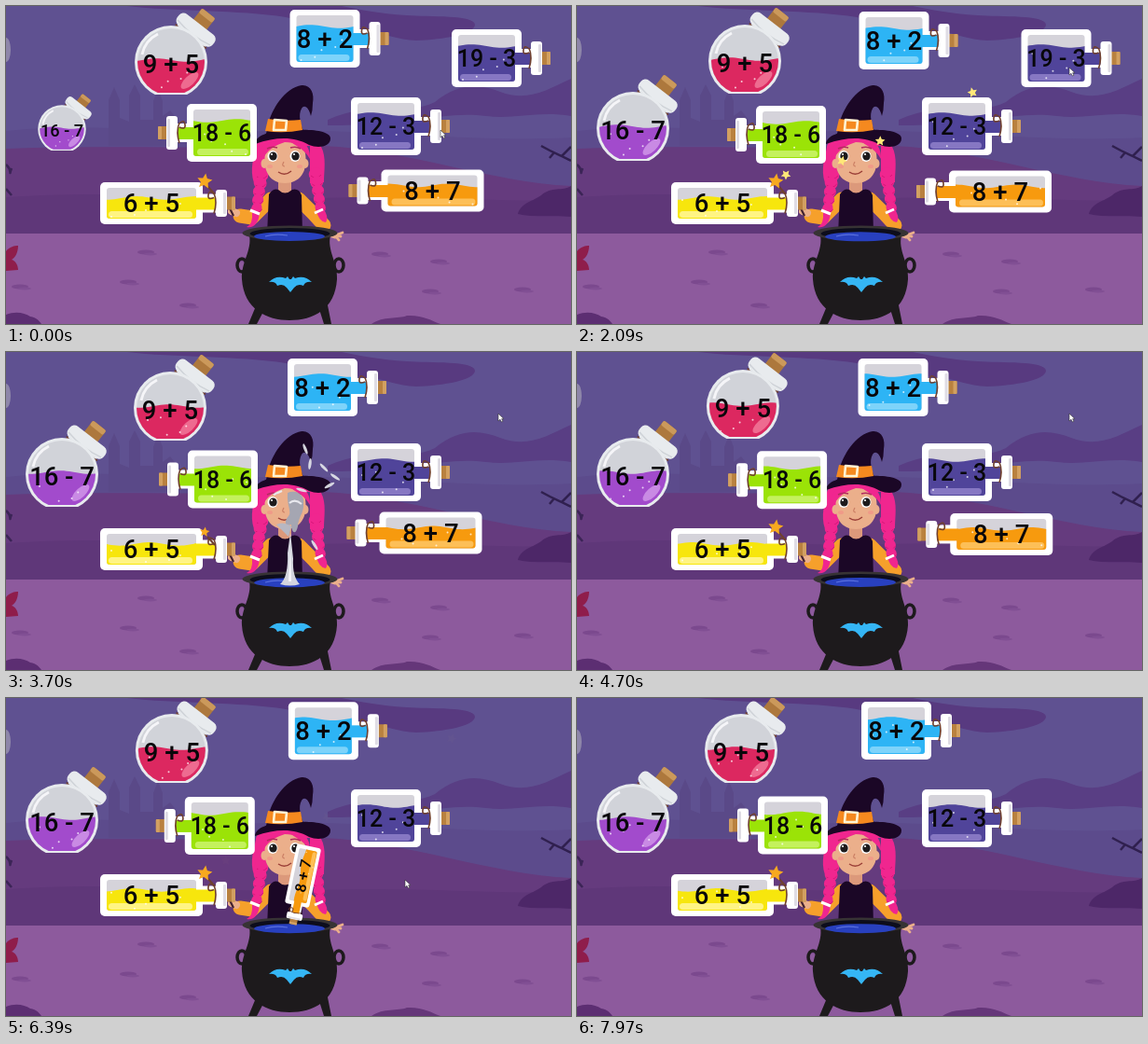
Write an HTML page with a canvas that moves like this. It is 606 px wide and 341 px high and loops after 8030 ms.

```html
<!DOCTYPE html>
<html lang="en">
<head>
<meta charset="utf-8">
<title>Potion sums</title>
<style>
html, body { margin: 0; width: 100%; height: 100%; overflow: hidden; background: #5f5191; }
canvas { display: block; width: 606px; height: 341px; }
</style>
</head>
<body>
<canvas id="stage"></canvas>
<script>
const LOOP = 8030, TAU = Math.PI * 2;
const canvas = document.getElementById('stage');
const c = canvas.getContext('2d');
const dpr = window.devicePixelRatio || 1;
canvas.width = 606 * dpr;
canvas.height = 341 * dpr;

const INK = '#1d1a1c', SKIN = '#ebaf8b', PINK = '#f0268f', HAT = '#1b0726', ORANGE = '#f6a02b';

// Drawing helpers
function path(d, fill, stroke, width = 1) {
  const p = new Path2D(d);
  if (fill) { c.fillStyle = fill; c.fill(p); }
  if (stroke) { c.strokeStyle = stroke; c.lineWidth = width; c.stroke(p); }
}
function oval(x, y, rx, ry, fill, turn = 0) {
  c.beginPath();
  c.ellipse(x, y, rx, ry, turn, 0, TAU);
  c.fillStyle = fill;
  c.fill();
}
function box(x, y, w, h, r, fill) {
  c.beginPath();
  c.roundRect(x, y, w, h, r);
  c.fillStyle = fill;
  c.fill();
}
function star(x, y, r, fill, turn = 0) {
  c.beginPath();
  for (let i = 0; i < 10; i++) {
    const a = turn + i * TAU / 10 - TAU / 4, d = i % 2 ? r * .48 : r;
    c.lineTo(x + d * Math.cos(a), y + d * Math.sin(a));
  }
  c.fillStyle = fill;
  c.fill();
}
function group(draw, x = 0, y = 0, scale = 1, turn = 0) {
  c.save();
  c.translate(x, y);
  c.rotate(turn);
  c.scale(scale, scale);
  draw();
  c.restore();
}

// Timing helpers
const mix = (a, b, k) => a + (b - a) * k;
function ramp(t, from, to) {
  const k = Math.min(1, Math.max(0, (t - from) / (to - from)));
  return k * k * (3 - 2 * k);
}
const pulse = (t, a, b, d, e) => ramp(t, a, b) * (1 - ramp(t, d, e));
const KEYS = [0, 850, 2090, 3700, 5760, 6970, 7970];
function drift(values, t) {
  let i = 0;
  while (i < values.length - 2 && t > KEYS[i + 1]) i++;
  return mix(values[i], values[i + 1], ramp(t, KEYS[i], KEYS[i + 1]));
}

function backdrop() {
  c.fillStyle = '#5f5191';
  c.fillRect(0, 0, 606, 341);
  path('M130 0C180 6 250 4 300 12C330 18 350 26 385 27C405 28 420 37 440 37C470 36 503 30 503 20C502 9 455 12 430 10C400 8 380 4 360 0Z', '#583a80');
  path('M345 122C395 100 430 118 460 103C485 82 508 83 530 92C560 103 580 90 606 78V118C570 112 545 122 515 118C470 112 440 128 345 128Z', '#593e84');
  path('M0 134C90 124 180 137 290 134C400 132 500 147 606 141V200H0Z', '#5c4b8c');
  path('M110 150V101L116 87L122 101V120L132 124V96L138 84L144 96V122H158V102L163 89L168 102V118L176 112L184 122V150Z', '#5a4988');
  path('M0 153C120 149 250 154 340 150C430 154 520 189 606 193V246H0Z', '#653b7e');
  path('M0 205C120 196 220 210 340 206C450 202 530 212 606 207V246H0Z', '#5f3779');
  path('M549 223C552 211 566 209 574 203C585 193 597 199 606 193V226C590 224 565 227 549 223Z', '#4d2768');
  path('M574 150C588 158 595 160 606 166M588 157L583 163M596 161L606 151', null, '#30204f', 2.5);
  path('M0 170C8 177 2 184 6 174M0 196L6 203', null, '#3b2456', 2.5);
  oval(0, 47, 5, 13, '#8e86a9');
  c.fillStyle = '#8d5a9d';
  c.fillRect(0, 244, 606, 97);
  for (const [x, y] of [[15, 301], [131, 296], [257, 272], [150, 264], [195, 321], [455, 306], [554, 304], [401, 266], [464, 274]]) {
    oval(x, y, 9, 2.4, '#7b498e');
    oval(x + 5, y + 2, 7, 1.5, '#814f94');
  }
  path('M0 331C10 327 20 329 26 333C33 334 36 338 38 341H0Z', '#5c2e72');
  path('M392 341C405 332 420 336 430 332C446 331 456 337 466 341Z', '#653679');
  path('M0 263C4 258 9 257 13 257C13 264 10 270 6 272C10 273 13 278 13 283L0 284Z', '#8f1d4b');
}

function limb(points, color, width) {
  c.beginPath();
  points.forEach(p => c.lineTo(...p));
  c.strokeStyle = color;
  c.lineWidth = width;
  c.lineJoin = 'round';
  c.lineCap = 'round';
  c.stroke();
  c.lineCap = 'butt';
}

function hat() {
  path('M281 128C285 110 299 88 317 85C327 84 331 94 329 104Q329 112 327 118C325 109 320 105 317 110C313 117 316 127 320 137L279 137Z', HAT);
  path('M267 148C268 139 281 134 300 134C326 131 348 134 348 142C348 151 335 153 325 149C309 140 291 140 267 148Z', HAT);
  path('M281 121Q299 124 316 122L318 133Q298 137 278 134Z', '#f5891f');
  path('M288 122L301 123L300 133L287 133Z', null, '#fff3d3', 2.6);
}

function braid(x, y, dx, lean) {
  for (let i = 0; i < 5; i++) {
    oval(x + dx * i, y + 9 * i, 7.5 - i * .5, 6.5, PINK, lean);
    path(`M${x + dx * i - 5} ${y + 9 * i + 2}q6 5 11 -1`, null, '#d51778', 1);
  }
}

function head(soot) {
  path('M268 151C270 135 330 133 338 151C344 162 341 177 341 189L326 190V150H279V190H266C261 174 266 163 268 151Z', PINK);
  braid(274, 181, -1.3, .4);
  braid(332, 180, 1.3, -.4);
  path('M264 222Q265 234 258 237Q270 239 272 222Z', PINK);
  path('M333 219Q335 231 343 232Q347 226 340 217Z', PINK);
  path('M262 219L272 223M331 222L340 218', null, '#fff', 3);
  box(292, 184, 14, 20, 5, '#dc997b');
  oval(277, 169, 3.5, 5, SKIN);
  oval(321, 169, 3.5, 5, SKIN);
  path('M278 158C279 142 319 142 321 158C324 178 315 190 299 190C284 190 275 178 278 158Z', SKIN);
  path('M272 161C274 140 298 137 304 144C294 148 282 151 276 163ZM302 143C317 139 327 150 326 164C319 152 311 151 302 143Z', PINK);
  path('M280 153Q285 150 291 152M305 152Q311 150 316 153', null, '#b42c60', 1.6);
  for (const x of soot < .5 ? [286, 310] : [286]) {
    oval(x, 161, 5.5, 6, '#fff');
    oval(x + .5, 161, 4.2, 4.6, INK);
    oval(x - 1, 159, 1.1, 1.1, '#fff');
  }
  path('M298 167Q295 172 299 172', null, '#c97d63', 1.2);
  path('M292 178Q299 183 306 177', null, '#9b4038', 1.4);
  oval(283, 172, 3, 2, '#f09a88');
  oval(315, 172, 3, 2, '#f09a88');
  if (soot) {
    c.globalAlpha = soot;
    path('M302 151C310 147 321 152 319 163C320 172 313 178 313 187C311 197 306 194 306 185C299 188 298 182 303 176C307 172 301 165 302 151Z', '#a5a6b2');
    path('M304 162Q310 157 317 163M287 153l9 -4', null, '#e8e8ee', 2.2);
    path('M290 185Q297 181 306 187L303 198Q296 191 290 185Z', '#b7b7c2');
    c.globalAlpha = 1;
  }
  hat();
}

function witch(raise, soot) {
  const dx = 7 * raise;
  const at = (x0, y0, x1, y1) => [mix(x0, x1, raise), mix(y0, y1, raise)];
  const hand = at(242, 220, 240, 178);
  const right = at(353, 246, 360, 230);
  limb([[284, 207], at(264, 227, 258, 206), at(251, 225, 247, 190)], ORANGE, 15);
  limb([[314, 207], at(329, 222, 329, 225), at(341, 235, 347, 229)], ORANGE, 15);
  limb([at(247, 222, 244, 184), hand], SKIN, 8);
  path(`M${hand[0] - 3} ${hand[1] - 5}l5 10`, null, '#432230', 2.2);
  limb([[right[0] - 6, right[1] - 2], right], SKIN, 7);
  for (let i = 0; i < 3; i++) limb([right, [right[0] + 8 - i * 2, right[1] - 3 + i * 4]], SKIN, 2.8);
  group(() => head(soot), dx, 0);
  path(`M${282 + dx} 202Q${287 + dx} 195 ${292 + dx} 197Q${299 + dx} 204 ${307 + dx} 197Q${314 + dx} 195 ${317 + dx} 203L318 245H280Z`, HAT);
}

function cauldron(t) {
  path('M270 317L260 341H269L278 324ZM335 322L341 341H349L344 316Z', INK);
  for (const x of [253, 357]) {
    c.beginPath();
    c.ellipse(x, 278, 5, 7, 0, 0, TAU);
    c.strokeStyle = INK;
    c.lineWidth = 3.5;
    c.stroke();
  }
  path('M261 246C264 262 252 275 253 293C255 325 280 337 304 337C330 337 353 325 355 293C356 275 344 262 348 246Z', INK);
  oval(304.5, 243.5, 51, 8, '#373334');
  oval(304.5, 244, 43, 6, '#0d0d1c');
  oval(304, 247 + .4 * Math.sin(t / 250), 38, 5, '#2840bf');
  path('M278 247q10 -3 24 -1', null, '#5a70e0', 1.2);
  path('M282 296Q290 288 300 292L302 290L304 293H306L308 290L310 292Q320 288 328 296Q321 295 319 300Q313 297 309 302L305 307L301 302Q297 297 291 300Q289 295 282 296Z', '#35b6f5');
}

function liquid(left, right, level, bottom, color, t) {
  c.beginPath();
  c.moveTo(left, bottom);
  for (let x = left; x <= right; x += 3) c.lineTo(x, level + 1.8 * Math.sin(x / 10 + t / 330));
  c.lineTo(right, bottom);
  c.fillStyle = color;
  c.fill();
}
function bubbles(w, top, bottom, t) {
  for (let i = 0; i < 5; i++) {
    const k = (t / 2200 + i * .37) % 1;
    oval((i * .43 % 1 - .5) * w, mix(bottom, top, k), 1, 1, 'rgba(255,255,255,.75)');
  }
}
function label(text, size) {
  c.font = `500 ${size}px Roboto, "Liberation Sans", sans-serif`;
  c.textAlign = 'center';
  c.fillStyle = '#08070a';
  c.fillText(text, 0, size * .36);
}

function flask(b, t) {
  const wide = b.w > 100, h = wide ? 45 : 62, W = b.w / 2, H = h / 2, n = wide ? 4 : 0, tall = wide ? 29 : 36;
  c.save();
  c.scale(b.dir, 1);
  box(W + 21 + n, -7, 10, 14, 1, '#b9813f');
  box(W + 27 + n, -7, 4, 14, 1, '#d2a061');
  box(W - 2, -10, 14 + n, 20, 0, '#fff');
  box(-W, -H, b.w, h, 5, '#fff');
  box(-W + 7, -H + 6, b.w - 14, h - 12, 3, '#d5d3da');
  c.save();
  c.beginPath();
  c.roundRect(-W + 7, -H + 6, b.w - 14, h - 12, 3);
  c.clip();
  liquid(-W, W, -H * (wide ? .25 : .42), H, b.color, t);
  box(-W + 9, H - 14, b.w - 20, 7, 4, b.light);
  bubbles(b.w - 24, -H * .2, H - 8, t);
  c.restore();
  box(W - 9, -6, 20 + n, 13, 0, b.color);
  box(W + 10 + n, -tall / 2, 12, tall, 3, '#fff');
  box(W + 18 + n, -tall / 2 + 3, 3, tall - 6, 1, '#dfdce4');
  path(`M${W + 8 + n} -11q4 10 0 22M${W + 8 + n} -10q-5 -5 -6 1t6 3`, null, '#70402f', 1.6);
  c.restore();
  label(b.text, b.size);
}

function globe(b, t) {
  group(() => {
    box(-9, -66, 18, 20, 2, '#ad783d');
    box(-9, -66, 18, 6, 2, '#cb995b');
    box(-19, -40, 38, 18, 3, '#dfe2e6');
    box(-24, -51, 48, 15, 6, '#e8ebee');
    path('M-22 -40Q0 -35 22 -40', null, '#cfd3d8', 1.5);
    path('M-21 -35Q0 -29 21 -35M-20 -33Q0 -26 20 -33', null, '#70402f', 1.5);
  }, 0, 0, 1, .66);
  c.save();
  c.beginPath();
  c.rect(-45, -45, 90, 80);
  c.clip();
  oval(0, 0, 39, 39, '#e8ebee');
  c.beginPath();
  c.arc(0, 0, 36, 0, TAU);
  c.clip();
  c.fillStyle = '#d1d3d9';
  c.fillRect(-40, -40, 80, 73);
  liquid(-40, 40, -2, 33, b.color, t);
  oval(20, 20, 12, 5, b.light, -.75);
  bubbles(48, 5, 30, t);
  c.restore();
  path('M-31 -8Q-28 -23 -14 -30', null, '#f5f5f8', 3);
  group(() => label(b.text, 27.5), 0, 2);
}

// x and y hold the floating positions at KEYS; drop is the moment of the click
const bottles = [
  { text: '9 + 5', x: [177, 177, 180, 176, 180, 176, 176], y: [60, 59, 59, 60, 56, 56, 56], color: '#dc2860', light: '#ee6b90' },
  { text: '16 - 7', x: [60, 60], y: [132, 131], color: '#a24bcc', light: '#c98ae4', grow: true },
  { text: '8 + 2', w: 75, dir: 1, size: 27.5, x: [342, 341, 340, 339.5, 338.5, 342, 342.5], y: [35, 36, 37, 38, 38, 33, 35], color: '#2db4f5', light: '#7dd3fa' },
  { text: '19 - 3', w: 75, dir: 1, size: 25, x: [515.5, 514.5, 514], y: [56, 57, 56], color: '#50449a', light: '#8677c3', drop: 2500 },
  { text: '18 - 6', w: 75, dir: -1, size: 25, x: [231.5, 230.5, 229.5, 232.5, 228.5, 230, 231.5], y: [136, 134, 138, 136.5, 138, 136, 136.5], color: '#9be307', light: '#c4f15d' },
  { text: '12 - 3', w: 75, dir: 1, size: 25, x: [407.5, 407.5], y: [129, 129], color: '#50449a', light: '#8677c3' },
  { text: '6 + 5', w: 110, dir: 1, size: 27.5, x: [156, 156], y: [211.5, 211.5], color: '#f7e60d', light: '#fff483' },
  { text: '8 + 7', w: 110, dir: -1, size: 27.5, x: [457.5, 456, 454, 455.5, 455], y: [198, 198, 199, 194, 197], color: '#f79a0e', light: '#fdbf57', drop: 6000 }
];

function bottle(b, t) {
  const fall = b.drop ? t - b.drop : 0;
  if (fall > 720) return;
  const k = ramp(fall, 0, 480), sink = ramp(fall, 430, 720);
  const x = mix(drift(b.x, t), 305, k);
  const y = mix(drift(b.y, t), 190, k) + 52 * sink;
  const scale = b.grow ? mix(.66, 1, ramp(t, 0, 450)) : (1 - .45 * k) * (1 - .8 * sink);
  group(() => (b.w ? flask : globe)(b, t), x, y, scale, b.drop ? b.dir * 1.5 * k : 0);
}

function sparkles(phase) {
  if (phase < 350 || phase > 1150) return;
  const k = (phase - 500) / 390;
  const flights = [[337, 173, 87, -80], [294, 173, 31, -28], [262, 170, 22, -4], [205, 192, 19, -11]];
  c.globalAlpha = 1 - ramp(phase, 950, 1150);
  flights.forEach(([x, y, vx, vy], i) => {
    if (i < 3 || phase > 650) star(x + vx * k, y + vy * k, 5.6, '#ffe878', k + i * .3);
  });
  c.globalAlpha = 1;
}

function splash(t) {
  const jet = pulse(t, 3280, 3420, 3650, 4000);
  if (!jet) return;
  const top = 250 - 60 * jet;
  path(`M294 249Q303 241 302 ${top + 22}L305 ${top}L308 ${top + 28}Q307 241 315 249Q305 252 294 249Z`, '#d4d5de');
  path(`M303 246L305 ${top + 14}L306 246Z`, '#f6f6fa');
  c.globalAlpha = jet;
  const spread = ramp(t, 3280, 3700);
  const drops = [[353, 134, .6], [347, 143, -.5], [321, 104, 1.2], [326, 120, 1.7], [341, 124, .8], [331, 207, 1], [317, 148, .3]];
  for (const [x, y, a] of drops) oval(mix(305, x, spread), mix(235, y, spread), 6, 1.6, '#dfe0e8', a);
  c.globalAlpha = 1;
}

function flash(t) {
  const f = pulse(t, 6660, 6930, 7030, 7480);
  if (!f) return;
  const glow = c.createRadialGradient(304, 231, 2, 304, 231, 36);
  glow.addColorStop(0, `rgba(255,255,255,${f})`);
  glow.addColorStop(.3, `rgba(190,170,255,${f * .9})`);
  glow.addColorStop(.65, `rgba(75,60,235,${f * .6})`);
  glow.addColorStop(1, 'rgba(60,40,220,0)');
  oval(304, 231, 36, 36, glow);
  oval(304, 242, 24 * f, 4, `rgba(255,190,130,${f})`);
  c.beginPath();
  for (let i = 0; i <= 12; i++) {
    const u = i / 6 - 1;
    const lift = i % 2 ? .55 : 1;
    c.lineTo(304 + 20 * u, 243 - 38 * f * lift * (1 - Math.abs(u) * .75) * (.94 + .06 * Math.sin(t / 60 + i)));
  }
  c.lineTo(304, 246);
  c.fillStyle = `rgba(255,255,255,${f})`;
  c.fill();
  path(`M308 ${240 - 60 * f}V225M295 ${240 - 42 * f}V225`, null, `rgba(255,255,255,${f * .8})`, 1);
}

function cursor(t) {
  if (t > 7500) return;
  const a = ramp(t, 100, 750), b = ramp(t, 5200, 5700);
  const x = mix(mix(466, 528, a), 428, b), y = mix(mix(133, 66, a), 195, b);
  group(() => path('M0 0V8L2 6.3L3.5 9L5 8.2L3.6 5.7H6Z', '#fff', '#333', .6), x, y);
}

function render(t) {
  c.setTransform(dpr, 0, 0, dpr, 0, 0);
  backdrop();
  const phase = t - (t < 4000 ? 1200 : 5260);
  const raise = pulse(phase, 200, 460, 540, 830);
  const soot = pulse(t, 3320, 3440, 4250, 4600);
  witch(raise, soot);
  cauldron(t);
  bottles.forEach(b => bottle(b, t));
  if (raise < .8) {
    const x = mix(213, 250, raise), y = mix(188, 168, raise) + 5 * soot;
    path(`M${x + 3} ${y + 5}l8 9`, null, '#70402f', 2);
    star(x, y, 8.5 - 3 * soot, '#f7a91f', .15);
  }
  splash(t);
  flash(t);
  sparkles(phase);
  cursor(t);
}

function tick() {
  render(performance.now() % LOOP);
  requestAnimationFrame(tick);
}
tick();
</script>
</body>
</html>
```
